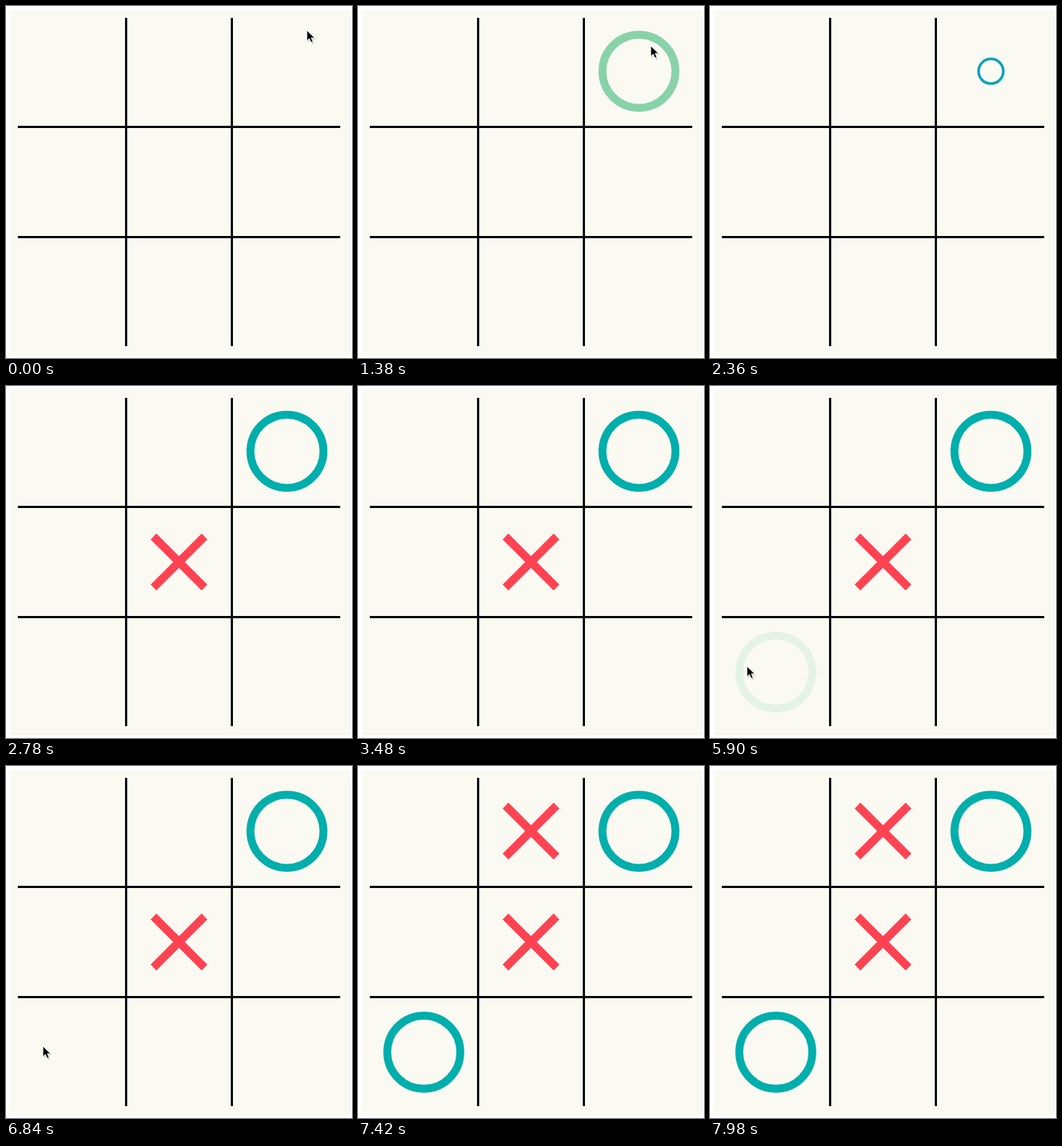
An HTML page that plays this animation: 468 px wide and 476 px high, repeating every 8 s.

```html
<!DOCTYPE html>
<html lang="en">
<head>
<meta charset="utf-8">
<title>Noughts and crosses</title>
<style>
  html, body { margin: 0; width: 100%; height: 100%; overflow: hidden; background: #fff; }
  svg { display: block; width: 100%; height: 100%; }
  #nought { fill: none; stroke-width: 10.6; }
  #cross { fill: none; stroke: #ff4352; stroke-width: 11; }
</style>
</head>
<body>
<svg viewBox="0 0 468 476">
  <defs>
    <circle id="nought" r="49.4"/>
    <path id="cross" d="M-34.5-34.5 34.5 34.5M34.5-34.5-34.5 34.5"/>
  </defs>
  <rect x="5" y="6.5" width="460" height="465" rx="3" fill="#efefe4"/>
  <rect x="5" y="6.5" width="459" height="464" rx="3" fill="#fafaf3"/>
  <path d="M162.5 16V460M305.5 16V460M16 163.5H452M16 312.5H452" stroke="#000" stroke-width="3"/>
  <g id="marks"></g>
  <g id="cursor">
    <path d="M1 2V16L4.5 13 7 18.5 9.5 17.5 7.5 12H12Z" opacity=".18"/>
    <path d="M0 0V14L3.3 11 5.7 16.3 8.2 15.2 5.9 10H10.4Z" stroke="#fff" stroke-width=".8"/>
  </g>
</svg>
<script>
const LOOP = 8000, GROW = 320, FADE = 300;
const TEAL = '#00aeac', BLUE = '#0d9cc5', PALE = '#88d2aa';

// Each turn: a pale preview comes and goes, then the nought grows, then the reply
const REPLY_DELAY = 220;
const turns = [
  { hover: 580, leave: 1680, start: 2236, nought: [380, 88.3], cross: [234, 238] },
  { hover: 5820, leave: 6440, start: 6840, nought: [89, 387], cross: [234, 88] }
];

// [time, x, y] of the pointer tip; it stays in place between moves
const moves = [
  [[580, 407, 33], [1300, 396, 54], [2240, 396, 54], [2350, 480, 36]],
  [[5580, -14, 388], [5900, 50, 379], [6850, 50, 379], [6950, -14, 379]]
];

const layer = document.getElementById('marks');
const cursor = document.getElementById('cursor');
const progress = (t, start, length) => Math.min(1, Math.max(0, (t - start) / length));
const ease = p => p * p * (3 - 2 * p);

function addMark(type) {
  const node = document.createElementNS('http://www.w3.org/2000/svg', 'use');
  node.setAttribute('href', '#' + type);
  layer.append(node);
  return node;
}

function place(node, [x, y], scale = 1) {
  node.setAttribute('transform', `translate(${x} ${y}) scale(${scale})`);
}

for (const turn of turns) {
  turn.previewNode = addMark('nought');
  turn.noughtNode = addMark('nought');
  turn.crossNode = addMark('cross');
  turn.previewNode.style.stroke = PALE;
  place(turn.previewNode, turn.nought);
}

function drawTurn(turn, t) {
  const { hover, leave, start } = turn;
  turn.previewNode.style.opacity = ease(progress(t, hover, FADE)) - ease(progress(t, leave, FADE));

  const scale = ease(progress(t, start, GROW));
  place(turn.noughtNode, turn.nought, scale);
  turn.noughtNode.style.stroke = `color-mix(in srgb, ${TEAL} ${scale * 100}%, ${BLUE})`;
  place(turn.crossNode, turn.cross, ease(progress(t, start + REPLY_DELAY, GROW)));
}

function drawCursor(t) {
  const path = moves.findLast((move, i) => i === 0 || t >= move[0][0]);
  let [, x, y] = path[0];
  for (let i = 1; i < path.length; i++) {
    const [t0, x0, y0] = path[i - 1], [t1, x1, y1] = path[i];
    const p = ease(progress(t, t0, t1 - t0));
    x += (x1 - x0) * p;
    y += (y1 - y0) * p;
  }
  place(cursor, [x, y]);
}

function frame() {
  const t = performance.now() % LOOP;
  turns.forEach(turn => drawTurn(turn, t));
  drawCursor(t);
  requestAnimationFrame(frame);
}
frame();
</script>
</body>
</html>
```
